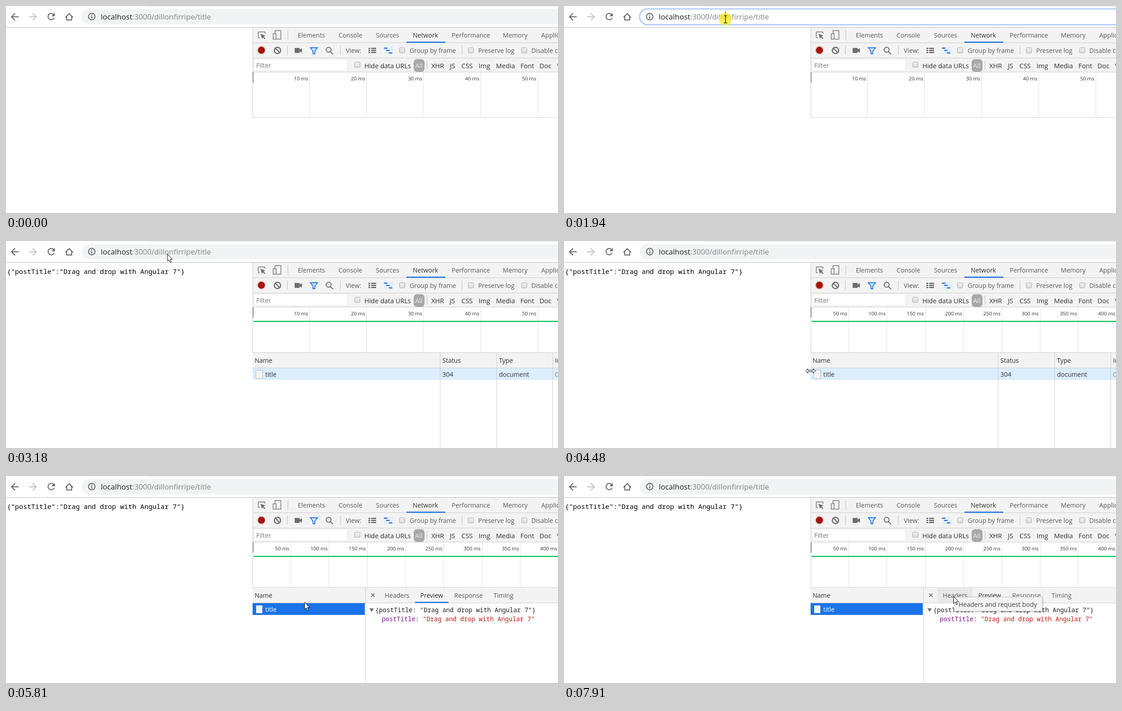
An HTML page that plays this animation: 1220 by 459 pixels, repeating every 8000 ms.

```html
<!DOCTYPE html>
<html lang="en">
<head>
<meta charset="utf-8">
<title>Network panel</title>
<style>
  html, body { margin: 0; width: 100%; height: 100%; overflow: hidden; background: #fff; }
  svg { display: block; width: 1220px; height: 459px; }
  text { font: 14px "Open Sans", "Noto Sans", sans-serif; fill: #5a5a5a; white-space: pre; }
  .dark text, text.dark { fill: #303030; }
  #row3 text { font-size: 14.5px; }
  .url text { font-size: 16.6px; fill: #80868b; }
  .url .host { fill: #202124; }
  .tick { font-size: 11.2px; fill: #333; text-anchor: end; }
  .json { font: 14.9px "Noto Sans Mono", "DejaVu Sans Mono", monospace; fill: #000; }
  .tree text { font: 13.75px "Noto Sans Mono", "DejaVu Sans Mono", monospace; fill: #222; }
  .key { fill: #881391; }
  .str { fill: #c41a16; }
  .line { fill: none; stroke: #5f6368; stroke-width: 2; }
  .thin { fill: none; stroke: #6e6e6e; stroke-width: 1.4; }
  .rule { fill: none; stroke: #ccc; }
  .tip { fill: #f3f3f3; stroke: #c0c0c0; filter: drop-shadow(1px 2px 2px #0003); }
  .blue { fill: #1a73e8; }
  .cursor { fill: #fff; stroke: #000; stroke-width: 1; stroke-linejoin: round; }
</style>
</head>
<body>
<svg viewBox="0 0 1220 459">
  <rect width="1220" height="459" fill="#fff"/>

  <!-- address bar -->
  <path d="M308 .5H1220" stroke="#dee1e6"/>
  <path d="M0 47.5H1220" stroke="#b9b9b9"/>
  <path class="line" d="M28 24H13M20 16.2L12.2 24l7.8 7.8"/>
  <path class="line" style="stroke:#bdc1c6" d="M51 24H66M59 16.2L66.800 24 59 31.800"/>
  <g data-to="2470"><use href="#reload"/></g>
  <g data-from="2470" data-to="3180"><path class="line" d="M93 17l14 14M107 17L93 31"/></g>
  <g data-from="3180"><use href="#reload"/></g>
  <path class="line" d="M131.500 25.200L139.700 17l8.200 8.200M134.200 23.500V31h11V23.500"/>
  <rect x="167" y="7" width="1100" height="34" rx="17" fill="#f1f3f4"/>
  <g data-from="1940" data-to="2470">
    <rect x="167.200" y="6.500" width="1100" height="35" rx="17.500" fill="#fff" stroke="#a9c6f8" stroke-width="2.500"/>
  </g>
  <circle class="line" cx="189.500" cy="23.500" r="7.200" stroke-width="1.700"/>
  <path class="line" d="M189.500 19v2M189.500 22.500v5.500"/>
  <g class="url"><text x="209.500" y="30"><tspan class="host">localhost</tspan>:3000/dillonfirripe/title</text></g>
  <g class="url" data-from="2170" data-to="2470">
    <rect x="210" y="12" width="243" height="23" fill="#0078d7"/>
    <text x="209.500" y="30" style="fill:#fff">localhost:3000/dillonfirripe/title</text>
  </g>
  <g data-from="1940" data-to="2170"><path d="M356.500 11v26" stroke="#222"/></g>

  <g data-from="3180"><text class="json" x="2" y="73">{"postTitle":"Drag and drop with Angular 7"}</text></g>

  <!-- tool bars -->
  <rect x="545" y="48" width="675" height="99" fill="#f3f3f3"/>
  <path class="rule" d="M545 81.500H1220M545 115.500H1220M545 146.500H1220M545 247.500H1220M545.500 48V248"/>
  <path class="rule" stroke-width="1.500" d="M623 54V75M622 88V108M739 88V108M1008 88V108M930.500 121V141"/>
  <path class="thin" d="M561 70.500h-2.500q-1 0-1-1v-11q0-1 1-1h13q1 0 1 1v3"/>
  <path d="M562.500 61.500l11 4.200-4.300 1.800 4 4.200-1.700 1.700-4.200-4.200-1.500 4z" fill="#6e6e6e"/>
  <path class="thin" d="M594.500 60.500v-6h13v19h-9M590.500 61.500h6.500v12h-6.500z"/>
  <g id="tabs"></g>
  <rect class="blue" x="885" y="79" width="86" height="2.500"/>

  <circle cx="564.500" cy="98" r="10" fill="#e2d2c4"/>
  <circle cx="564.500" cy="98" r="7.700" fill="#a5120d"/>
  <path d="M607 98.500a7 7 0 1 0-14 0a7 7 0 1 0 14 0M595.500 93.500l9.500 10" fill="none" stroke="#6e6e6e" stroke-width="2.500"/>
  <path d="M638 93h11v3.500l5-3v10l-5-3v3.500h-11z" fill="#6e6e6e"/>
  <path d="M672.500 92.500h16l-6 7.500v6h-4v-6z" fill="#d5e5fb" stroke="#1a73e8" stroke-width="1.800"/>
  <path d="M718.500 97a5.500 5.500 0 1 0-11 0a5.500 5.500 0 1 0 11 0M717 101l6 6" fill="none" stroke="#6e6e6e" stroke-width="2"/>
  <path d="M801 94h4m2 0h11M801 98.500h4m2 0h11M801 103h4m2 0h11" stroke="#5c5c5c" stroke-width="2.700"/>
  <path d="M842 93h14M836 98h5m9 0h6M836 104h9" stroke="#c9def8" stroke-width="1.500"/>
  <path d="M835 93.500h8M840 98.500h8M846 104h8" stroke="#1a73e8" stroke-width="2.500"/>
  <g id="row2"></g>

  <rect x="550" y="119" width="203" height="23" fill="#fff"/>
  <text x="553" y="137" style="fill:#757575">Filter</text>
  <rect x="901" y="118" width="24" height="28" rx="7" fill="#a8a8a8"/>
  <g id="row3" class="dark"></g>
  <text x="904.500" y="137.500" style="fill:#fff;text-shadow:0 1px #777">All</text>
  <g id="boxes"></g>

  <!-- timeline -->
  <rect x="545" y="147" width="2" height="23" fill="#8a8a8a"/>
  <g id="short" data-to="3250"></g>
  <g id="long" data-from="3250"></g>
  <g data-from="3180"><rect x="547" y="177" width="673" height="2.500" fill="#0cc45a"/></g>

  <!-- request list -->
  <g data-from="2550">
    <rect x="545" y="248" width="675" height="33" fill="#f3f3f3"/>
    <path class="rule" d="M545 281.500H1220"/>
    <text class="dark" x="549.500" y="270">Name</text>
  </g>
  <g class="dark" data-from="2550" data-to="5110">
    <rect x="545" y="282" width="675" height="26" fill="#dcedff"/>
    <path class="rule" d="M959.500 248V459M1084.500 248V459M1208.500 248V459"/>
    <text x="964.500" y="270">Status</text><text x="1089.500" y="270">Type</text><text x="1213.500" y="270">Initiator</text>
    <use href="#file" color="#a8a8a8"/><text x="573" y="301">title</text>
  </g>
  <g data-from="2550" data-to="3180"><text x="964.500" y="301" style="fill:#888">(pending)</text></g>
  <g class="dark" data-from="3180" data-to="5110">
    <text x="964.500" y="301">304</text><text x="1089.500" y="301">document</text>
    <text x="1213" y="301" style="fill:#888">Other</text>
  </g>

  <!-- details -->
  <g data-from="5110">
    <rect class="blue" x="545" y="282" width="248" height="26"/>
    <use href="#file" color="#1a73e8"/><text x="573" y="301" style="fill:#fff">title</text>
    <path class="rule" d="M794.500 248V459"/>
    <rect id="hover" x="825" y="249" width="78" height="32" fill="#e8e8e8"/>
    <path d="M807 260.500l7.500 7.500M814.500 260.500l-7.500 7.500" stroke="#5a5a5a" stroke-width="1.500"/>
    <g id="panes"></g>
    <rect class="blue" x="904" y="279" width="74" height="2.500"/>
    <path d="M803 293.500h10l-5 7.500z" fill="#6e6e6e"/>
    <g class="tree">
      <text x="816" y="302">{postTitle: "Drag and drop with Angular 7"}</text>
      <text x="830.500" y="322"><tspan class="key">postTitle</tspan>: <tspan class="str">"Drag and drop with Angular 7"</tspan></text>
    </g>
  </g>
  <g id="linkTip">
    <rect class="tip" x="587" y="303.500" width="271" height="31"/>
    <text x="598" y="325">http://localhost:3000/dillonfirripe/title</text>
  </g>
  <g id="headTip">
    <rect class="tip" x="862" y="268.500" width="195" height="31"/>
    <text x="872" y="290" style="fill:#444">Headers and request body</text>
  </g>

  <!-- pointer -->
  <g id="pointer">
    <circle id="halo" r="14" fill="#fbe80d"/>
    <path id="arrow" class="cursor" d="M0 0V15.800L3.700 12.400L6.200 18.500L8.600 17.500L6.100 11.600H11z"/>
    <path id="beam" d="M-3.500-7.500H-1Q0-7.500 0-6.500Q0-7.500 1-7.500H3.500M0-6.500V7.500M-3.500 8.500H-1Q0 8.500 0 7.500Q0 8.500 1 8.500H3.500" fill="none" stroke="#222" stroke-width="1.300"/>
    <path id="resize" class="cursor" d="M-11 0l5-5v3.500H6V-5l5 5-5 5V1.500H-6V5z"/>
    <path id="hand" class="cursor" d="M-1.500 1.500q0-1.500 1.500-1.500t1.500 1.500V7.500q3-1.200 3.500.8 3-1 3.500.9 2.500-.4 2.500 2V16q0 3-2.500 6H-.5Q-2 18.500-6 14q-.5-3 2-2.500l2.500 2z"/>
  </g>

  <defs>
    <g id="reload">
      <path class="line" d="M105.700 19.600A7 7 0 1 0 106.500 26"/>
      <path d="M107.800 15.500v7.300h-7.300z" fill="#5f6368"/>
    </g>
    <g id="file">
      <rect x="552.500" y="286.500" width="14.500" height="18" rx="1" fill="#fff" stroke="currentColor"/>
      <path d="M555 291h9m-9 3h9m-9 3h9m-9 3h9" stroke="#dedede"/>
    </g>
    <linearGradient id="bevel" x2="0" y2="1"><stop stop-color="#f0f0f0"/><stop offset="1" stop-color="#dcdcdc"/></linearGradient>
  </defs>
</svg>
<script>
const LOOP = 8000;
const $ = id => document.getElementById(id);
const labels = (id, y, items) => {
  $(id).innerHTML = items.map(([x, s, style = '']) => `<text x="${x}" y="${y}" style="${style}">${s}</text>`).join('');
};

const active = 'fill:#303030';
labels('tabs', 70, [[645, 'Elements'], [735, 'Console'], [817.5, 'Sources'], [899, 'Network', active],
  [985, 'Performance'], [1098, 'Memory'], [1183, 'Application']]);
labels('row2', 104, [[751, 'View:'], [892, 'Group by frame'], [1043.5, 'Preserve log'], [1161, 'Disable cache']]);
labels('row3', 137.5, [[792, 'Hide data URLs'], [940, 'XHR'], [981, 'JS'], [1006.5, 'CSS'], [1044.5, 'Img'],
  [1083, 'Media'], [1137, 'Font'], [1179, 'Doc'], [1218, 'WS']]);
labels('panes', 270, [[837, 'Headers'], [915.5, 'Preview', active], [990.5, 'Response'], [1077.5, 'Timing']]);

$('boxes').innerHTML = [[870, 92], [1022, 92], [1140, 92], [771, 124]].map(([x, y]) =>
  `<rect x="${x - .5}" y="${y + .5}" width="12" height="11.500" rx="2" fill="url(#bevel)" stroke="#a9a9a9"/>`).join('');

function timeline(id, step, pitch, count) {
  let out = '';
  for (let i = 1; i <= count; i++) {
    const x = 544.6 + pitch * i;
    out += `<path d="M${Math.floor(x) + .5} 147V247" stroke="#dedede"/><text class="tick" x="${x - 3}" y="165">${step * i} ms</text>`;
  }
  $(id).innerHTML = out;
}
timeline('short', 10, 126.1, 5);
timeline('long', 50, 84.6, 8);

// Pointer moves: start, end, steps, first point, bend, last point
const moves = [
  [300, 760, 7, [1051, 445], [800, 345], [619, 301]],
  [1090, 1770, 10, [600, 282], [445, 115], [357, 29]],
  [3880, 4110, 4, [372, 62], [472, 245], [443, 284]],
  [4480, 4880, 6, [545, 288], [585, 292], [602, 304]],
  [5660, 6440, 11, [618, 298], [770, 221], [939, 299]],
  [6520, 6520, 1, [942, 301], [942, 301], [942, 301]],
  [7220, 7700, 8, [968, 285], [1200, 154], [861, 267]]
];

function pointerAt(t) {
  const move = moves.filter(m => t >= m[0]).pop();
  if (!move) return null;
  const [start, end, steps, a, b, c] = move;
  let f = 1;
  if (t < end) f = Math.floor((t - start) / (end - start) * (steps - 1) + 1e-6) / (steps - 1);
  f = f * (2 - f) * .4 + f * .6;
  const g = 1 - f;
  return [0, 1].map(k => g * g * a[k] + 2 * g * f * b[k] + f * f * c[k]);
}

function pointerKind(t, x, y) {
  if (t < 3180 && y < 42) return 'beam';
  if (t > 4400 && Math.abs(x - 545) < 3) return 'resize';
  if (t > 4400 && x < 793 && y > 282 && y < 308) return 'hand';
  return 'arrow';
}

// Holds the value of the last step reached: [time, value]
const stepValue = (t, steps) => steps.reduce((v, [at, next]) => t >= at ? next : v, 0);
const show = (el, on) => { el.style.display = on ? '' : 'none'; };
const timed = [...document.querySelectorAll('[data-from],[data-to]')];

function render(t) {
  for (const el of timed) {
    show(el, t >= (el.dataset.from || 0) && t < (el.dataset.to || LOOP));
  }
  $('linkTip').style.opacity = stepValue(t, [[4880, 1], [5110, .5], [5200, .2], [5260, 0]]);
  $('headTip').style.opacity = stepValue(t, [[7830, .5], [7910, 1]]);
  $('halo').style.opacity = stepValue(t, [[1940, .7], [2170, 0], [5110, .65], [5200, .3], [5260, 0]]);

  const p = pointerAt(t);
  show($('pointer'), p);
  show($('hover'), p && t > 7220 && p[0] > 825 && p[0] < 903 && p[1] > 249 && p[1] < 281);
  if (!p) return;
  const [x, y] = p.map(Math.round);
  $('pointer').setAttribute('transform', `translate(${x} ${y})`);
  const kind = pointerKind(t, x, y);
  for (const k of ['arrow', 'beam', 'resize', 'hand']) show($(k), k === kind);
}

const begin = performance.now();
function frame() {
  render((performance.now() - begin) % LOOP);
  requestAnimationFrame(frame);
}
frame();
</script>
</body>
</html>
```
